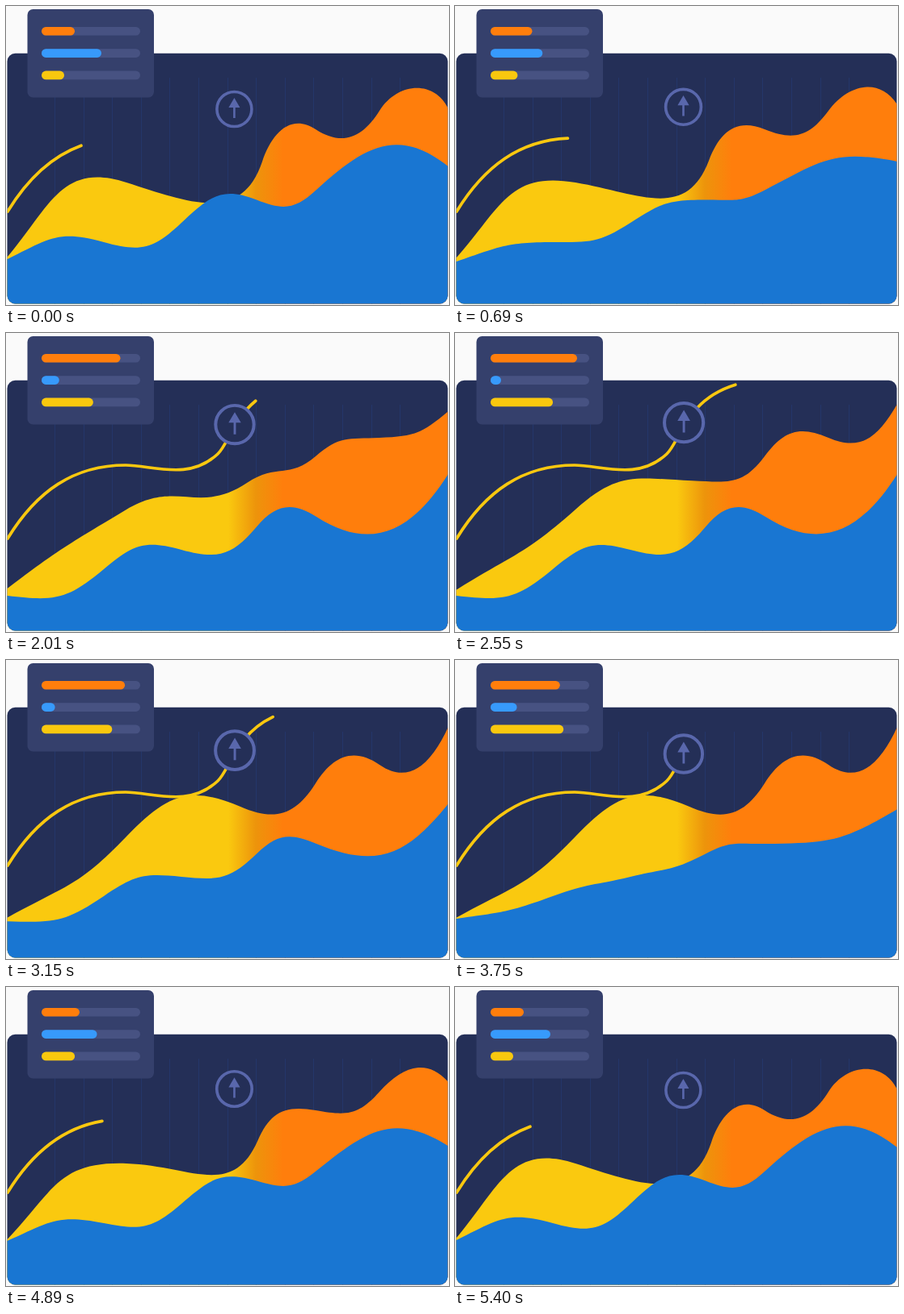
These frames come from a looping animation (548 px wide and 371 px high, 5.43 s). An HTML page:

```html
<!DOCTYPE html>
<html lang="en">
<head>
<meta charset="utf-8">
<title>Animated area chart</title>
<style>
  html, body { margin: 0; width: 100%; height: 100%; overflow: hidden; background: #fafafa; }
  svg { display: block; }
</style>
</head>
<body>
<svg width="548" height="371" viewBox="0 0 548 371">
  <defs>
    <linearGradient id="heat" gradientUnits="userSpaceOnUse" x1="275" x2="343" y1="0" y2="0">
      <stop offset="0" stop-color="#fac90f"/>
      <stop offset=".5" stop-color="#ed940b"/>
      <stop offset="1" stop-color="#ff7e0c"/>
    </linearGradient>
    <clipPath id="panel"><rect x="1.5" y="58.7" width="545" height="310.8" rx="10"/></clipPath>
  </defs>
  <g clip-path="url(#panel)">
    <rect width="548" height="371" fill="#242f57"/>
    <path id="grid" stroke="#24366a"/>
    <path id="trend" d="M2,255C38,196 84,164 148,164C181,164 226,184 262,150C279,134 285,82 349,63.5"
      pathLength="1" fill="none" stroke="#fac80f" stroke-width="3.7" stroke-linecap="round"/>
    <g id="icon">
      <circle r="21.5" fill="#242f57" stroke="#5967ac" stroke-width="3.6"/>
      <path d="M0,-14L7,-2H1.3V11H-1.3V-2H-7Z" fill="#5967ac"/>
    </g>
    <path id="back" fill="url(#heat)"/>
    <path id="front" fill="#1976d2"/>
  </g>
  <rect x="26.5" y="4" width="156.5" height="109.5" rx="7" fill="#35406c"/>
  <g id="bars"></g>
</svg>
<script>
const LOOP = 5430;
const $ = id => document.getElementById(id);
const mix = (a, b, k) => a + (b - a) * k;
const ease = x => (1 - Math.cos(Math.PI * Math.min(1, Math.max(0, x)))) / 2;

// Rises until `up`, holds until `down`, then falls back by the end of the loop.
const swing = (t, up, down = up) =>
  t < down ? ease(t / up) : 1 - ease((t - down) / (LOOP - down));

// Knots: x, y, slope at rest, slope at full swing, shift of x and y at full swing.
// Crests turn into troughs as the slopes tip over.
const BACK = [
  [2, 311, -1.2, -.55, 0, 8.5],
  [149, 219, .32, -1.05],
  [317, 193, -3, .45, -27, -11],
  [383, 153, .65, -1.6],
  [462, 130, -1.6, .7],
  [547, 127, 2, -2.2, 0, -44]
];
const FRONT = [
  [2, 314, -.5, .12, 0, 12],
  [121, 293, .28, -.84],
  [217, 269, -.95, .28],
  [310, 240.5, .4, -1.2],
  [384, 228, -.92, .65],
  [547, 199, .8, -1.6, 0, -24]
];

function wave(knots, k) {
  const pts = knots.map(([x, y, s0, s1, dx = 0, dy = 0]) =>
    ({ x: x + dx * k, y: y + dy * k, angle: Math.atan(mix(s0, s1, k)) }));
  const handle = (p, len) => `${p.x + len * Math.cos(p.angle)},${p.y + len * Math.sin(p.angle)} `;
  let d = `M0,371V${pts[0].y}H${pts[0].x}`;
  for (let i = 1; i < pts.length; i++) {
    const a = pts[i - 1], b = pts[i];
    const len = .48 * Math.hypot(b.x - a.x, b.y - a.y);
    d += "C" + handle(a, len) + handle(b, -len) + `${b.x},${b.y}`;
  }
  return d + "H548V371Z";
}

let grid = "";
for (let i = 0; i < 13; i++) grid += `M${Math.round(61 + 35.6 * i) - .5},89V371`;
$("grid").setAttribute("d", grid);

const bar = (y, w, fill) => `<rect x="44" y="${y}" width="${w}" height="10.6" rx="5.3" fill="${fill}"/>`;
$("bars").innerHTML = ["#ff7e0c", "#379afc", "#f9c80e"]
  .map((color, i) => bar(26 + 27.3 * i, 122, "#475282") + bar(26 + 27.3 * i, 0, color)).join("");
const fills = document.querySelectorAll("#bars rect:nth-child(even)");

function draw(now) {
  const t = (now + 15) % LOOP;
  const p = swing(t, LOOP / 2);
  $("back").setAttribute("d", wave(BACK, swing(t, 3300, 3700)));
  $("front").setAttribute("d", wave(FRONT, swing(t, 2100, 2400)));
  $("trend").setAttribute("stroke-dasharray", `${mix(.292, 1, p)} 2`);
  $("icon").setAttribute("transform",
    `translate(${282.4 + .7 * p},${128 - 17 * p}) scale(${1 + .12 * p})`);
  const widths = [mix(41, 107.5, p), mix(74, 12.5, p), mix(28, 90.5, swing(t, 3700))];
  fills.forEach((f, i) => f.setAttribute("width", widths[i]));
}

const start = performance.now();
function tick() {
  draw(performance.now() - start);
  requestAnimationFrame(tick);
}
tick();
</script>
</body>
</html>
```
